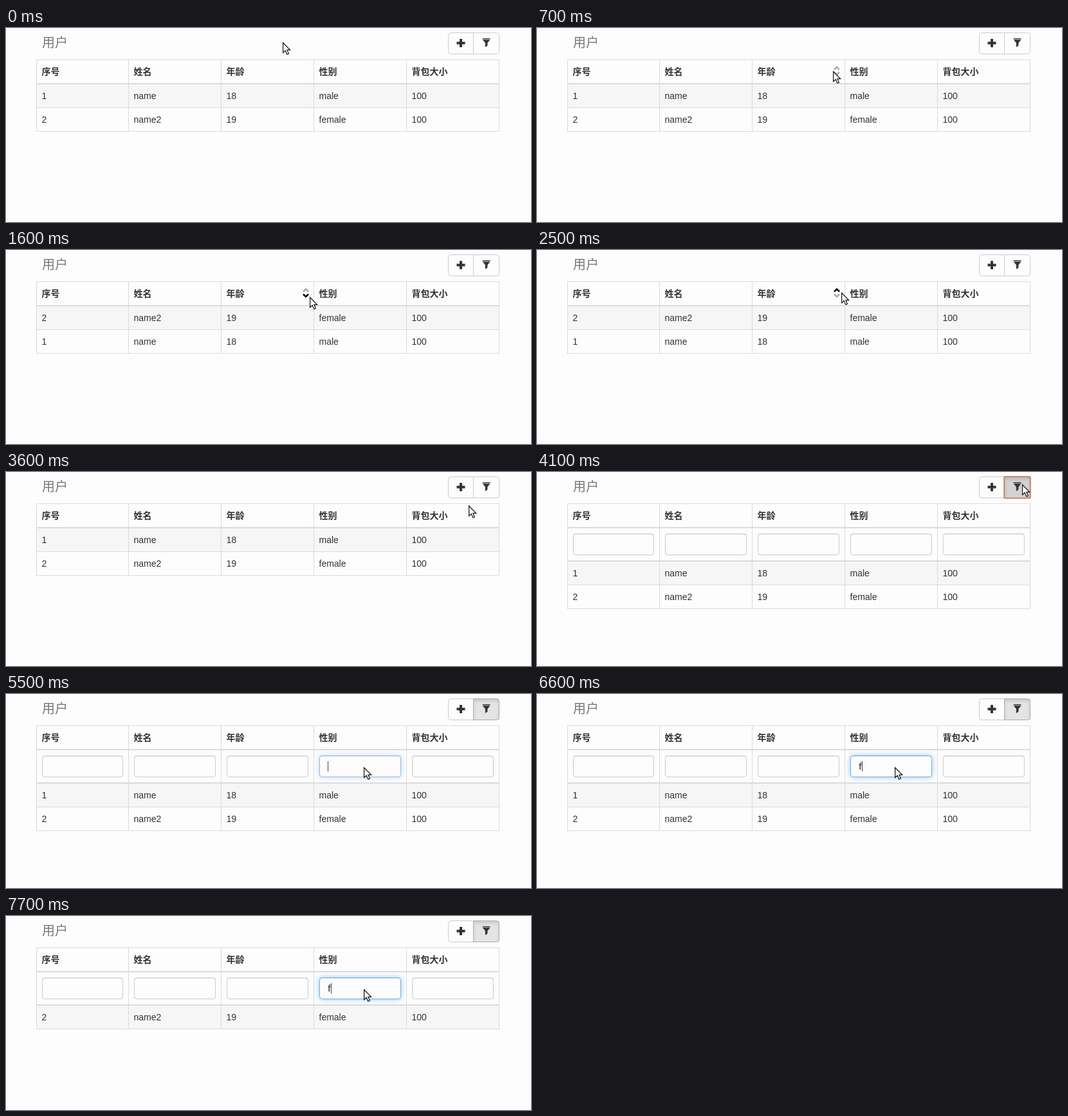
These frames come from a looping animation (816x303 px, 8000 ms). An HTML page with a canvas:

```html
<!DOCTYPE html>
<html lang="zh-CN">
<head>
<meta charset="utf-8">
<title>用户</title>
<style>
html, body { margin: 0; width: 816px; height: 303px; overflow: hidden; background: #fefdfe; }
body { position: relative; }
canvas { position: absolute; left: 0; top: 0; }
span {
  position: absolute; white-space: pre; color: #333;
  font: 14px/20px "Liberation Sans", "Noto Sans CJK SC", "Noto Sans CJK", sans-serif;
}
.title { font-size: 20px; color: #777; }
.bold { font-weight: bold; }
.typed { color: #555; }
</style>
</head>
<body>
<canvas id="base" width="816" height="303"></canvas>
<div id="text"></div>
<canvas id="pointer" width="816" height="303"></canvas>
<script>
const LOOP = 8000, STEP = 100;
const PAPER = '#fefdfe', STRIPE = '#f7f6f7', LINE = '#dcdbdc', INK = '#333';
const COLS = [47, 190, 334, 478, 622, 766];
const HEADS = ['序号', '姓名', '年龄', '性别', '背包大小'];
const USERS = [['1', 'name', '18', 'male', '100'], ['2', 'name2', '19', 'female', '100']];

// pointer tip: time, x, y
const PATH = [
  [0, 430, 22], [100, 430, 23], [200, 430, 23], [800, 466, 76], [900, 466, 76],
  [1000, 472, 74], [1100, 472, 73], [2000, 472, 73], [2200, 473, 69], [2300, 473, 69],
  [2400, 473, 66], [3200, 473, 66], [3600, 719, 52], [4000, 754, 20], [4100, 754, 19],
  [4500, 754, 19], [4800, 468, 107], [4900, 468, 107], [5000, 449, 113], [5100, 449, 113],
  [5200, 533, 118], [5300, 533, 118], [5400, 556, 114], [LOOP, 556, 114]
];

const g = document.getElementById('base').getContext('2d');
const p = document.getElementById('pointer').getContext('2d');
const textBox = document.getElementById('text');

function addText(str, x, y, cls = '') {
  const el = document.createElement('span');
  el.textContent = str;
  el.className = cls;
  el.style.left = x + 'px';
  el.style.top = y + 'px';
  textBox.append(el);
  return el;
}

const textX = i => COLS[i] + 8.5;
addText('用户', 56, 13, 'title');
HEADS.forEach((h, i) => addText(h, textX(i), 58, 'bold'));
const cells = USERS.map(u => u.map((s, i) => addText(s, textX(i), 0)));
const typed = addText('f', 500, 103, 'bold typed');

function pointerAt(t) {
  const i = PATH.findIndex(k => k[0] > t);
  const [t0, x0, y0] = PATH[i - 1], [t1, x1, y1] = PATH[i];
  const u = (t - t0) / (t1 - t0);
  return [Math.round(x0 + (x1 - x0) * u), Math.round(y0 + (y1 - y0) * u)];
}

function rect(x, y, w, h, color) {
  g.fillStyle = color;
  g.fillRect(x, y, w, h);
}

function poly(c, pts) {
  c.beginPath();
  pts.forEach(([x, y]) => c.lineTo(x, y));
}

function box(x, y, w, h, radii, fill, stroke) {
  g.beginPath();
  g.roundRect(x + 0.5, y + 0.5, w - 1, h - 1, radii);
  g.fillStyle = fill;
  g.fill();
  g.strokeStyle = stroke;
  g.lineWidth = 1;
  g.stroke();
}

function insetShadow(x, y, w, h, dy, blur, alpha) {
  g.save();
  g.beginPath();
  g.rect(x, y, w, h);
  g.clip();
  g.shadowColor = `rgba(0,0,0,${alpha})`;
  g.shadowBlur = blur;
  g.shadowOffsetY = dy;
  g.beginPath();
  g.rect(x - 20, y - 20, w + 40, h + 40);
  g.rect(x, y, w, h);
  g.fillStyle = '#000';
  g.fill('evenodd');
  g.restore();
}

function drawButtons(hover, open, focused) {
  box(687, 7, 40, 34, [4, 0, 0, 4], PAPER, '#ccc');
  const fill = focused ? '#d3d2d3' : open || hover ? '#e5e4e5' : PAPER;
  const edge = focused ? '#8c8c8c' : open || hover ? '#adadad' : '#ccc';
  box(726, 7, 41, 34, [0, 4, 4, 0], fill, edge);
  if (open) insetShadow(727, 8, 39, 32, 3, 5, 0.125);
  if (focused) {
    g.beginPath();
    g.roundRect(726, 7, 41, 34, 2);
    g.strokeStyle = 'rgba(206,122,70,.85)';
    g.lineWidth = 1.7;
    g.stroke();
  }
  rect(700.5, 21.5, 13, 4, INK);
  rect(705, 17, 4, 13, INK);
  rect(740.7, 16, 11.8, 1.4, INK);
  poly(g, [[740.7, 18.2], [752.5, 18.2], [748.4, 23.2], [748.4, 27.6], [744.9, 30], [744.9, 23.2]]);
  g.fill();
}

function drawChevron(y, dir, color) {
  poly(g, [[462, y - 2 * dir], [466, y + 2 * dir], [470, y - 2 * dir]]);
  g.strokeStyle = color;
  g.lineWidth = 2.5;
  g.stroke();
}

function drawInput(i, glow) {
  const x = i ? COLS[i] + 9 : 56, w = i ? 127 : 126;
  const mix = (a, b) => Math.round(a + (b - a) * glow);
  g.save();
  g.shadowColor = `rgba(102,175,233,${0.6 * glow})`;
  g.shadowBlur = 8;
  box(x, 96, w, 34, 4, PAPER, '#ccc');
  g.restore();
  box(x, 96, w, 34, 4, PAPER, `rgb(${mix(204, 102)},${mix(204, 175)},${mix(204, 233)})`);
  insetShadow(x + 1, 97, w - 2, 32, 1, 1, 0.075);
}

function drawPointer(x, y) {
  p.clearRect(0, 0, 816, 303);
  p.save();
  p.translate(x, y);
  poly(p, [[0.6, 1], [0.6, 16.6], [4.2, 13.3], [6.8, 19.3], [9.4, 18.1], [6.9, 12.3], [11.6, 12.3]]);
  p.closePath();
  p.fillStyle = '#fff';
  p.fill();
  p.strokeStyle = '#111';
  p.lineWidth = 1.2;
  p.stroke();
  p.restore();
}

function drawTable(t, x, y) {
  const open = t >= 4100, hasF = t >= 6600, filtered = t >= 7000;
  const top = open ? 140 : 88;
  const order = filtered ? [1] : t >= 1600 && t < 3000 ? [1, 0] : [0, 1];
  const bottom = top + 37 * order.length;

  rect(47, top, 720, 36, STRIPE);
  rect(47, 49, 720, 1, LINE);
  rect(47, 86, 720, 2, LINE);
  if (open) rect(47, 138, 720, 2, LINE);
  order.forEach((_, r) => rect(47, top + 36 + 37 * r, 720, 1, LINE));
  COLS.forEach(c => rect(c, 49, 1, bottom - 49, LINE));

  cells.forEach((row, u) => {
    const r = order.indexOf(u);
    row.forEach(el => {
      el.style.display = r < 0 ? 'none' : '';
      el.style.top = top + 8 + 37 * r + 'px';
    });
  });

  if (x > 334 && x < 478 && y > 49 && y < 87) {
    drawChevron(63, -1, t >= 2500 ? '#000' : '#aaa');
    drawChevron(71, 1, t >= 1100 && t < 2500 ? '#000' : '#aaa');
  }

  if (open) {
    const glow = t < 5500 ? 0 : t < 6000 ? 0.65 : 1;
    HEADS.forEach((_, i) => drawInput(i, i === 3 ? glow : 0));
  }
  typed.style.display = hasF ? '' : 'none';
  const caret = (t >= 5500 && t < 6000) || (t >= 6500 && t < 7100) || t >= 7700;
  if (caret) rect(hasF ? 505 : 500, 105, 1, 16, '#444');
}

function draw(t) {
  const [x, y] = pointerAt(t);
  rect(0, 0, 816, 303, PAPER);
  drawTable(t, x, y);
  const hover = x >= 726 && x < 767 && y >= 7 && y < 41;
  drawButtons(hover, t >= 4000, t >= 4000 && t < 5500);
  drawPointer(x, y);
}

let start = null;
function tick(now) {
  if (start === null) start = now;
  draw(Math.floor(((now - start) % LOOP) / STEP) * STEP);
  requestAnimationFrame(tick);
}
draw(0);
requestAnimationFrame(tick);
</script>
</body>
</html>
```
